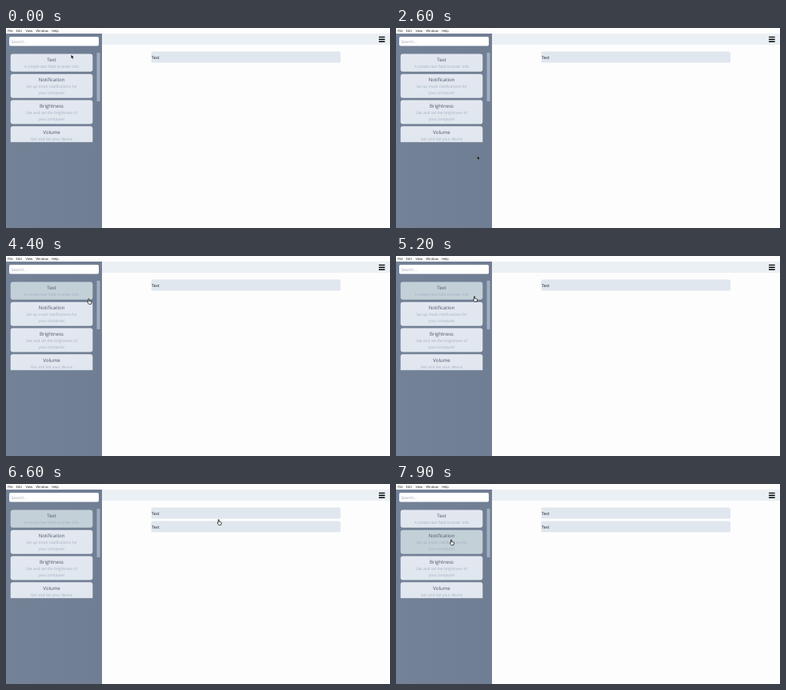
Animation of 480 by 251 pixels, one loop 8000 ms. Source, as an HTML page:

```html
<!DOCTYPE html>
<html lang="en">
<head>
<meta charset="utf-8">
<title>Drag a widget</title>
<style>
  html, body { margin: 0; width: 100%; height: 100%; overflow: hidden; background: #fdfdfe; }
  svg { display: block; width: 100%; height: 100%; }
  text { font-family: "Open Sans", "Noto Sans", sans-serif; text-rendering: geometricPrecision; }
  .menu { font-size: 4.1px; fill: #222; }
  .title { font-size: 6.05px; fill: #4a5568; text-anchor: middle; }
  .note { font-size: 4.75px; fill: #a0aec0; text-anchor: middle; }
  .field rect { fill: #e0e7ee; }
  .field text { font-size: 5.2px; fill: #1a202c; }
</style>
</head>
<body>
<svg viewBox="0 0 480 251" preserveAspectRatio="none">
  <defs>
    <linearGradient id="side" x2="1" y2="0">
      <stop offset="0" stop-color="#748297"/><stop offset="1" stop-color="#707e94"/>
    </linearGradient>
    <linearGradient id="card" x2="0" y2="1">
      <stop offset="0" stop-color="#e3e7f0"/><stop offset="1" stop-color="#e0e7ee"/>
    </linearGradient>
    <clipPath id="list"><rect x="0" y="30" width="112" height="113.3"/></clipPath>
  </defs>
  <rect width="480" height="251" fill="#fdfdfe"/>
  <rect y="7" width="120" height="244" fill="url(#side)"/>
  <rect x="120" y="7" width="360" height="14" fill="#ebf0f5"/>
  <g id="menu"></g>
  <rect x="4" y="11" width="112" height="11.5" rx="1.8" fill="#fff"/>
  <text x="6.5" y="18.8" font-size="5.05" fill="#a0a8b4">Search...</text>
  <rect x="113.5" y="31" width="4" height="61" rx=".6" fill="#a0aec0"/>
  <g id="cards" clip-path="url(#list)"></g>
  <path d="M466 11.4h7.6M466 14.2h7.6M466 17h7.6" stroke="#000" stroke-width="1.4"/>
  <g class="field">
    <rect x="181.5" y="29.6" width="236.7" height="14" rx="2.6"/><text x="182" y="38.7">Text</text>
  </g>
  <g class="field" id="dropped">
    <rect x="181.5" y="46.6" width="236.7" height="14" rx="2.6"/><text x="182" y="55.7">Text</text>
  </g>
  <path id="arrow" d="M0 0V4.8L1.1 3.8L1.9 5.5L2.6 5.2L1.9 3.5H3.3Z" fill="#000" stroke="#fff" stroke-width=".2"/>
  <path id="hand" d="M-1.5 .6V-3.1Q-.9-4-.3-3.1V-.7L1.9-.2Q2.7 0 2.6 .9L2.1 3.4H-.8L-2.6 .9Q-2.5 0-1.5 .6Z"
    fill="#fff" stroke="#111" stroke-width=".75" stroke-linejoin="round"/>
  <g id="blocked" fill="#fff" stroke="#000" stroke-width="1.1">
    <circle r="2.8"/><path d="M-2-2L2 2"/>
  </g>
</svg>
<script>
const LOOP = 8000, STEP = 100;
const GRAB = 5400, DROP = 6600, LEAVE = 7400;
const byId = id => document.getElementById(id);

function add(parent, tag, attrs, content = "") {
  const node = document.createElementNS("http://www.w3.org/2000/svg", tag);
  for (const key in attrs) node.setAttribute(key, attrs[key]);
  node.textContent = content;
  return parent.appendChild(node);
}

[["File", 2], ["Edit", 12.6], ["View", 24.4], ["Window", 37.5], ["Help", 57]]
  .forEach(([label, x]) => add(byId("menu"), "text", { class: "menu", x, y: 4.9 }, label));

const cards = [
  { top: 32.5, height: 22.3, title: "Text", notes: ["A simple text field to enter info"] },
  { top: 57.7, height: 30, title: "Notification", notes: ["Set up mock notifications for", "your computer"] },
  { top: 90.5, height: 30, title: "Brightness", notes: ["Get and set the brightness of", "your computer"] },
  { top: 123.3, height: 30, title: "Volume", notes: ["Get and Set your device", "volume"] }
];
for (const card of cards) {
  card.box = add(byId("cards"), "rect", { x: 5.7, y: card.top, width: 102.6, height: card.height, rx: 3 });
  add(byId("cards"), "text", { class: "title", x: 57, y: card.top + 9.7 }, card.title);
  card.notes.forEach((note, i) =>
    add(byId("cards"), "text", { class: "note", x: 57, y: card.top + 17.6 + i * 7.5 }, note));
}

// Pointer stops: time, x, y
const path = [
  [0, 81.5, 33.5], [900, 81.5, 33.5], [1800, 102.5, 112], [2200, 105.5, 146],
  [2600, 101.7, 160.5], [3200, 101, 172], [3600, 101, 174.5], [3700, 111, 79.3],
  [4500, 104, 56], [4800, 99, 54], [5300, 99, 54], [6200, 250, 48.3],
  [6300, 254.5, 48.6], [6600, 266.7, 48], [7300, 266.7, 48], [7900, 70, 73.3]
];
const smooth = k => k * k * (3 - 2 * k);

function pointerAt(t) {
  const next = path.findIndex(stop => stop[0] > t);
  if (next < 0) return path[path.length - 1].slice(1);
  const [t0, x0, y0] = path[next - 1], [t1, x1, y1] = path[next];
  const k = smooth((t - t0) / (t1 - t0));
  return [x0 + (x1 - x0) * k, y0 + (y1 - y0) * k];
}

function hovered(t, x, y) {
  if (t < 3700) return null;
  if (t >= GRAB && t < LEAVE) return cards[0];
  const tip = y - 3.5;
  return cards.find(c => x < 113 && tip > c.top && tip < c.top + c.height);
}

function draw(t) {
  const [x, y] = pointerAt(t);
  const active = hovered(t, x, y);
  for (const card of cards) card.box.setAttribute("fill", card === active ? "#c4d0d8" : "url(#card)");
  const shape = t < 3700 ? "arrow" : t >= GRAB && t < DROP ? "blocked" : "hand";
  for (const id of ["arrow", "hand", "blocked"]) {
    byId(id).style.display = id === shape ? "" : "none";
    byId(id).setAttribute("transform", `translate(${x} ${y})`);
  }
  byId("dropped").style.display = t >= DROP ? "" : "none";
}

const start = performance.now();
function tick() {
  const t = (performance.now() - start) % LOOP;
  draw(Math.floor(t / STEP) * STEP);
  requestAnimationFrame(tick);
}
tick();
</script>
</body>
</html>
```
